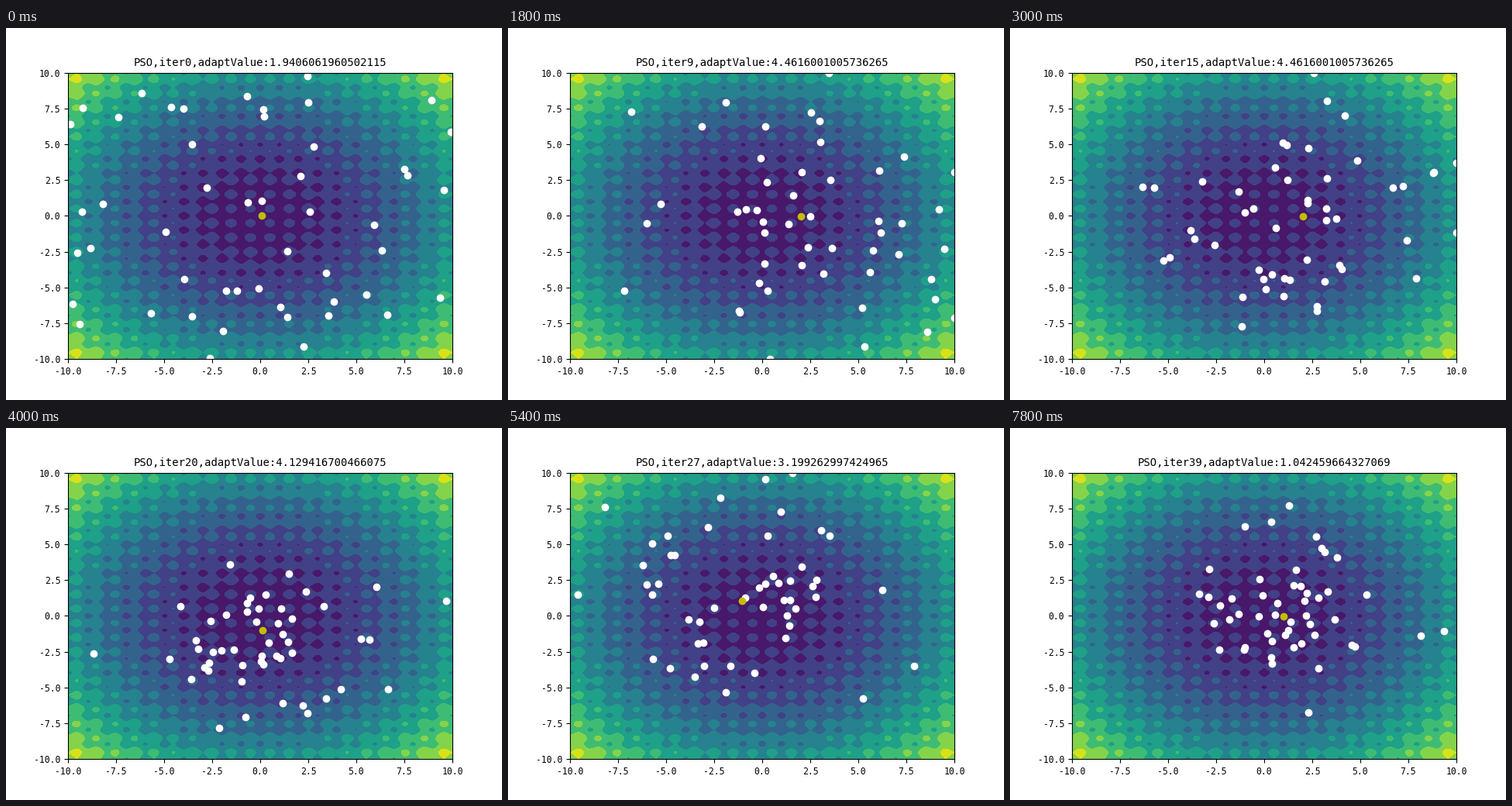
Write a matplotlib script that moves like this. It is 640 px wide and 480 px high and loops after 8 s.

```python
import numpy as np
import matplotlib.pyplot as plt
from matplotlib.animation import FuncAnimation

FRAMES, STEP_MS = 40, 200
LIMIT = 10
PARTICLES = 50
INERTIA, PULL = 0.6, 1.6

# First iteration, position and printed fitness of each leader
LEADERS = [
    (0, (0.10, 0.00), "1.9406061960502115"),
    (1, (2.03, -0.02), "4.4616001005736265"),
    (18, (0.13, -1.00), "4.129416700466075"),
    (24, (-1.03, 1.03), "3.199262997424965"),
    (30, (-1.07, -0.02), "2.1903854911672607"),
    (36, (1.01, -0.02), "1.042459664327069"),
]


def rastrigin(x, y):
    return (20 + x**2 + y**2
            - 10 * (np.cos(2 * np.pi * x) + np.cos(2 * np.pi * y)))


def leader(i):
    """Return the leader's position and fitness text at iteration i."""
    return [(pos, text) for first, pos, text in LEADERS if first <= i][-1]


def fly_swarm():
    """Return the particle positions at every iteration."""
    rng = np.random.default_rng(7)
    pos = rng.uniform(-LIMIT, LIMIT, (PARTICLES, 2))
    vel = np.zeros_like(pos)
    track = [pos]
    for jitter in np.linspace(2.5, 1.6, FRAMES - 1):
        best = np.array(leader(len(track))[0])
        vel = (INERTIA * vel
               + PULL * rng.random(pos.shape) * (best - pos)
               + jitter * rng.normal(size=pos.shape))
        pos = np.clip(pos + vel, -LIMIT, LIMIT)
        track.append(pos)
    return track


plt.rcParams.update({
    "font.family": "DejaVu Sans Mono",
    "axes.unicode_minus": False,
    "axes.titlesize": 9.97,
    "xtick.labelsize": 8.3,
    "ytick.labelsize": 8.3,
})

fig, ax = plt.subplots(figsize=(6.4, 4.8), dpi=100)
grid = np.linspace(-LIMIT, LIMIT, 400)
X, Y = np.meshgrid(grid, grid)
ax.contourf(X, Y, rastrigin(X, Y))
ax.set(xlim=(-LIMIT, LIMIT), ylim=(-LIMIT, LIMIT))

track = fly_swarm()
swarm = ax.scatter(*track[0].T, c="white")
gold = ax.scatter([0], [0], c="y")
title = ax.set_title("")


def update(i):
    pos, text = leader(i)
    swarm.set_offsets(track[i])
    gold.set_offsets([pos])
    title.set_text(f"PSO,iter{i},adaptValue:{text}")
    return swarm, gold, title


anim = FuncAnimation(fig, update, frames=FRAMES, interval=STEP_MS,
                     repeat=True, repeat_delay=0)
plt.show()
```
